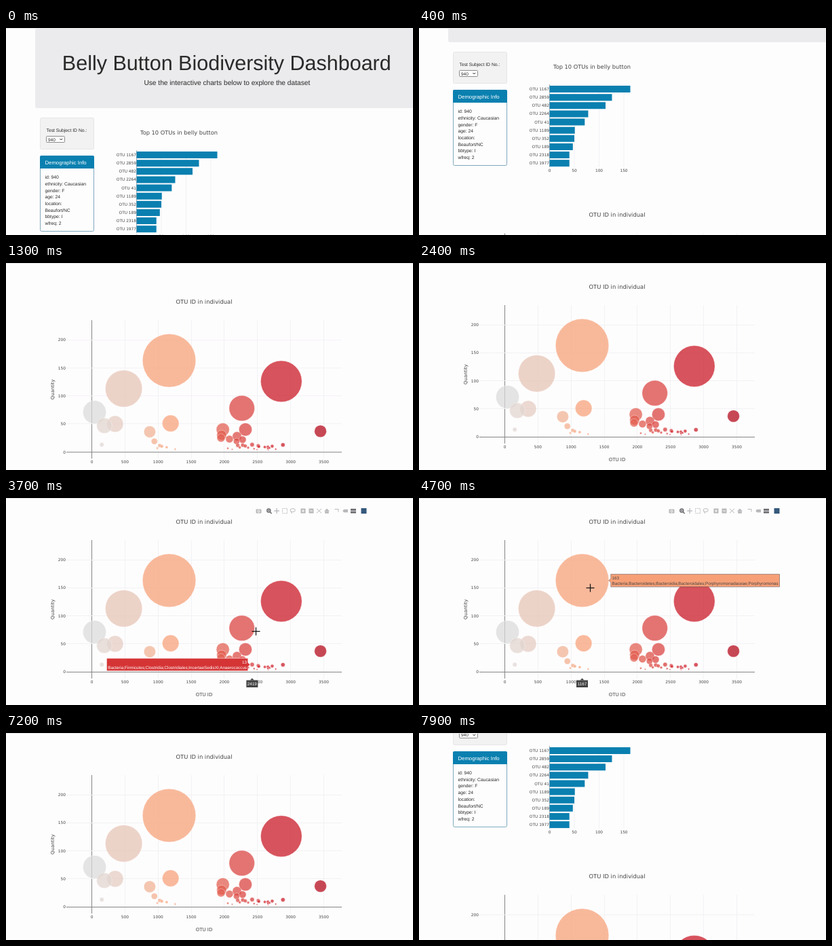
Write an HTML page with a canvas that moves like this. It is 600 px wide and 305 px high and loops after 8 s.

```html
<!DOCTYPE html>
<html lang="en">
<head>
<meta charset="utf-8">
<title>Belly Button Biodiversity Dashboard</title>
<style>
html, body { margin: 0; width: 100%; height: 100%; overflow: hidden; background: #fefdfe }
canvas { display: block }
</style>
</head>
<body>
<canvas id="stage" width="600" height="305"></canvas>
<script>
const ctx = document.getElementById('stage').getContext('2d');
const LOOP = 8000, STEP = 100, CHART_TOP = 337.5;
const SANS = '"Liberation Sans", Arial, sans-serif', PLOT = '"DejaVu Sans", Verdana, sans-serif';
const PAGE = '#fefdfe', BLUE = '#0a80b0', INK = '#2a2a2a', DARK = '#444', GRID = '#f2f1f3', AXIS = '#858585';

// [OTU id, quantity], largest first; the many rare ones are scattered by a seeded generator
const bubbles = [[1167, 163], [2859, 126], [482, 113], [2264, 78], [41, 71], [1189, 51], [352, 50], [189, 47],
  [2318, 40], [1977, 40], [3450, 37], [874, 36], [1959, 30], [2191, 28], [1950, 25], [2077, 23],
  [2275, 22], [944, 19], [2184, 19], [2419, 13]];
let seed = 7;
const random = () => (seed = seed * 16807 % 2147483647) / 2147483647;
for (let i = 0; i < 26; i++) {
  const id = i % 4 ? 2000 + random() * 960 : 150 + random() * 1200;
  bubbles.push([id, 13 - i * .38]);
}

const clostridia = 'Bacteria;Firmicutes;Clostridia;Clostridiales;IncertaeSedisXI';
const taxa = {
  1167: 'Bacteria;Bacteroidetes;Bacteroidia;Bacteroidales;Porphyromonadaceae;Porphyromonas',
  2264: clostridia,
  2419: clostridia + ';Anaerococcus',
  2859: clostridia + ';Peptoniphilus',
  3450: 'Bacteria;Proteobacteria;Epsilonproteobacteria;Campylobacterales;Campylobacteraceae;Campylobacter'
};
const named = bubbles.filter(([id]) => taxa[id]);

// Position followed by the values there
const cursorKeys = [[2600, 588, 150], [3500, 376, 192], [3700, 368.5, 196.5], [4700, 252.5, 132.5],
  [5300, 252.5, 140], [6000, 455.5, 250.5], [6500, 572, 138]];
const heatKeys = [[0, 220, 220, 220], [.33, 247, 160, 119], [.8, 204, 22, 34], [1, 178, 2, 20]];

function sample(keys, at) {
  const i = keys.findIndex(k => k[0] > at);
  if (i < 0) return keys.at(-1).slice(1);
  if (i === 0) return keys[0].slice(1);
  const a = keys[i - 1], b = keys[i], f = (at - a[0]) / (b[0] - a[0]);
  return a.slice(1).map((v, n) => v + (b[n + 1] - v) * f);
}

// Down at a steady pace, a stay at the bubble chart, then back up
function scrollAt(t) {
  return Math.min(t * .2425, CHART_TOP, CHART_TOP - (t - 7300) * .294);
}

// y is the middle of the capitals
function text(str, x, y, size, { align = 'left', color = INK, font = SANS } = {}) {
  ctx.font = `${size}px ${font}`;
  ctx.textAlign = align;
  ctx.fillStyle = color;
  ctx.fillText(str, x, y + size * .36);
}
function paint({ fill, stroke, width = 1 }) {
  if (fill) { ctx.fillStyle = fill; ctx.fill(); }
  if (stroke) { ctx.strokeStyle = stroke; ctx.lineWidth = width; ctx.stroke(); }
}
function rect(x, y, w, h, style, radius = 0) {
  ctx.beginPath();
  ctx.roundRect(x, y, w, h, radius);
  paint(style);
}
function circle(x, y, r, style) {
  ctx.beginPath();
  ctx.arc(x, y, r, 0, 7);
  paint(style);
}
function path(points, style) {
  ctx.beginPath();
  points.forEach(p => ctx.lineTo(...p));
  paint(style);
}
const line = (x1, y1, x2, y2, stroke, width) => path([[x1, y1], [x2, y2]], { stroke, width });
function cross(x, y, r, stroke, width) {
  line(x - r, y, x + r, y, stroke, width);
  line(x, y - r, x, y + r, stroke, width);
}

function drawHeader() {
  rect(43, 1, 570, 117, { fill: '#ebeaec' }, 3);
  text('Belly Button Biodiversity Dashboard', 325.3, 51, 30.5, { align: 'center' });
  text('Use the interactive charts below to explore the dataset', 325.8, 80, 10.18, { align: 'center' });
}

function drawSidebar() {
  rect(50.5, 132.5, 79, 46, { fill: '#f3f2f3', stroke: '#e6e5e6' }, 2);
  text('Test Subject ID No.:', 59.5, 151, 6.78);
  rect(59.5, 159.5, 27, 9, { fill: '#fff', stroke: '#8c8c8c' }, 1);
  text('940', 62, 164.2, 6.5);
  path([[79.5, 163], [81.3, 165], [83.1, 163]], { stroke: INK });

  rect(50.5, 188.5, 79, 111, { fill: PAGE, stroke: '#7fa9bd' }, 2);
  rect(50, 188, 80, 19, { fill: BLUE }, [2, 2, 0, 0]);
  text('Demographic Info', 57.5, 198, 7.75, { color: '#fff' });
  ['id: 940', 'ethnicity: Caucasian', 'gender: F', 'age: 24', 'location:', 'Beaufort/NC', 'bbtype: I', 'wfreq: 2']
    .forEach((s, i) => text(s, 57.5, 219.7 + i * 9.7, 6.78));
}

const plotLabel = { align: 'center', color: DARK, font: PLOT };
const sideLabel = { ...plotLabel, align: 'right' };

function drawBars() {
  const x = v => 192.5 + v * .73;
  text('Top 10 OTUs in belly button', 255, 154, 8.25, plotLabel);
  for (let v = 0; v <= 150; v += 50) {
    line(x(v), 180, x(v), 302, v ? GRID : '#b0b0b0');
    text(v, x(v), 306.5, 5.85, plotLabel);
  }
  bubbles.slice(0, 10).forEach(([id, value], i) => {
    const y = 187 + i * 12.13;
    rect(192.5, y - 5, value * .73, 10, { fill: BLUE });
    text('OTU ' + id, 192, y, 5.85, sideLabel);
  });
}

const px = id => 126.5 + id * .0977;
const py = value => 256.2 - value * .826;
const radius = value => value * .241;
const heat = id => `rgb(${sample(heatKeys, (id - 41) / 3409)})`;

function drawBubbles() {
  text('OTU ID in individual', 292, 34.5, 8.4, plotLabel);
  for (let id = 0; id <= 3500; id += 500) {
    const x = Math.floor(px(id)) + .5;
    line(x, 62, x, 266, id ? GRID : AXIS);
    text(id, px(id), 270.5, 5.85, plotLabel);
  }
  for (let v = 0; v <= 200; v += 50) {
    const y = Math.floor(py(v)) + .5;
    line(89, y, 495, y, v ? GRID : AXIS);
    text(v, 88, py(v), 5.85, sideLabel);
  }
  text('OTU ID', 292, 289, 7, plotLabel);
  ctx.save();
  ctx.translate(68.5, 164);
  ctx.rotate(-Math.PI / 2);
  text('Quantity', 0, 0, 6.9, plotLabel);
  ctx.restore();

  ctx.globalAlpha = .72;
  for (const [id, value] of bubbles) {
    circle(px(id), py(value), radius(value), { fill: heat(id), stroke: '#fff', width: .5 });
  }
  ctx.globalAlpha = 1;
}

function drawHover([id, value]) {
  const x = px(id), y = py(value), dir = id < 1500 ? 1 : -1;
  const style = dir > 0 ? { align: 'left', color: DARK } : { align: 'right', color: '#fff' };
  ctx.font = `6.28px ${SANS}`;
  const tip = x + dir * Math.max(3, radius(value)), near = tip + dir * 3;
  const far = near + dir * (ctx.measureText(taxa[id]).width + 3.5);
  path([[tip, y], [near, y - 3], [near, y - 9.3], [far, y - 9.3], [far, y + 9.3], [near, y + 9.3], [near, y + 3], [tip, y]],
    { fill: heat(id), stroke: style.color, width: .5 });
  text(value, near + dir * 1.7, y - 4.2, 6.28, style);
  text(taxa[id], near + dir * 1.7, y + 4, 6.28, style);

  path([[x, 265.5], [x + 3, 268.5], [x - 3, 268.5]], { fill: DARK });
  rect(x - 8.5, 268.5, 17, 10.5, { fill: DARK });
  text(id, x, 274, 6.28, { align: 'center', color: '#fff' });
}

function drawModebar() {
  const pale = '#b9b9bb', active = '#6d6d70', y = 19;
  // camera, zoom, pan
  rect(368.5, 16.5, 8, 6, { fill: pale }, 1);
  circle(372.5, 19.5, 1.5, { stroke: '#fff' });
  circle(387.3, 18.5, 2.5, { stroke: active, width: 1.5 });
  line(389, 20.3, 391.6, 23, active, 1.6);
  cross(387.3, 18.5, 1.3, active);
  cross(399.1, y, 3.9, pale, 1.3);
  // box and lasso select
  ctx.setLineDash([1.5, 1]);
  rect(407.5, 15.5, 7, 7, { stroke: pale });
  ctx.setLineDash([]);
  rect(419.2, 15.8, 7, 4.5, { stroke: pale }, 2.2);
  line(420, 19.5, 421.5, 23, pale);
  // zoom in, zoom out, autoscale, home
  for (const x of [438, 450]) {
    rect(x - 3.5, 15.5, 7, 7, { fill: pale });
    line(x - 2, y, x + 2, y, '#fff');
  }
  line(438, 17, 438, 21, '#fff');
  line(458, 15.8, 465, 22.2, pale);
  line(465, 15.8, 458, 22.2, pale);
  path([[469, 19.5], [473, 15.5], [477, 19.5]], { fill: pale });
  rect(470.2, 19.5, 5.6, 3.2, { fill: pale });
  // spikes, closest, compare, maker's link
  path([[484.5, 16.5], [490, 16.5], [490, 20.5]], { stroke: pale });
  path([[496.3, 19], [498, 16.8], [504, 16.8], [504, 21.2], [498, 21.2]], { fill: pale });
  for (const top of [15.8, 19.6]) rect(508, top, 8, 2.9, { fill: active });
  rect(523.5, 15, 8, 8, { fill: '#35597c' });
}

function drawCursor([x, y]) {
  if (x < 495) cross(x, y, 6, '#111', 1.2);
  else path([[x, y], [x, y + 9], [x + 2.3, y + 7], [x + 6.3, y + 6.4], [x, y]], { fill: '#fff', stroke: '#111', width: .7 });
}

function draw(t) {
  rect(0, 0, 600, 305, { fill: PAGE });
  ctx.save();
  ctx.translate(0, -scrollAt(t));
  drawHeader();
  drawSidebar();
  drawBars();
  ctx.translate(0, CHART_TOP);
  drawBubbles();
  ctx.restore();
  rect(0, 0, 600, 1, { fill: '#e6e5e7' });

  if (t >= 2700 && t < 7000) {
    drawModebar();
    // The label trails the pointer by one step and picks the closest id
    const [x] = sample(cursorKeys, t - STEP), gap = ([id]) => Math.abs(px(id) - x);
    if (x < 495) drawHover(named.reduce((a, b) => gap(b) < gap(a) ? b : a));
    drawCursor(sample(cursorKeys, t));
  }
}

ctx.textRendering = 'geometricPrecision';
const start = performance.now();
function frame() {
  const t = (performance.now() - start) % LOOP;
  draw(Math.floor(t / STEP) * STEP);
  requestAnimationFrame(frame);
}
frame();
</script>
</body>
</html>
```
